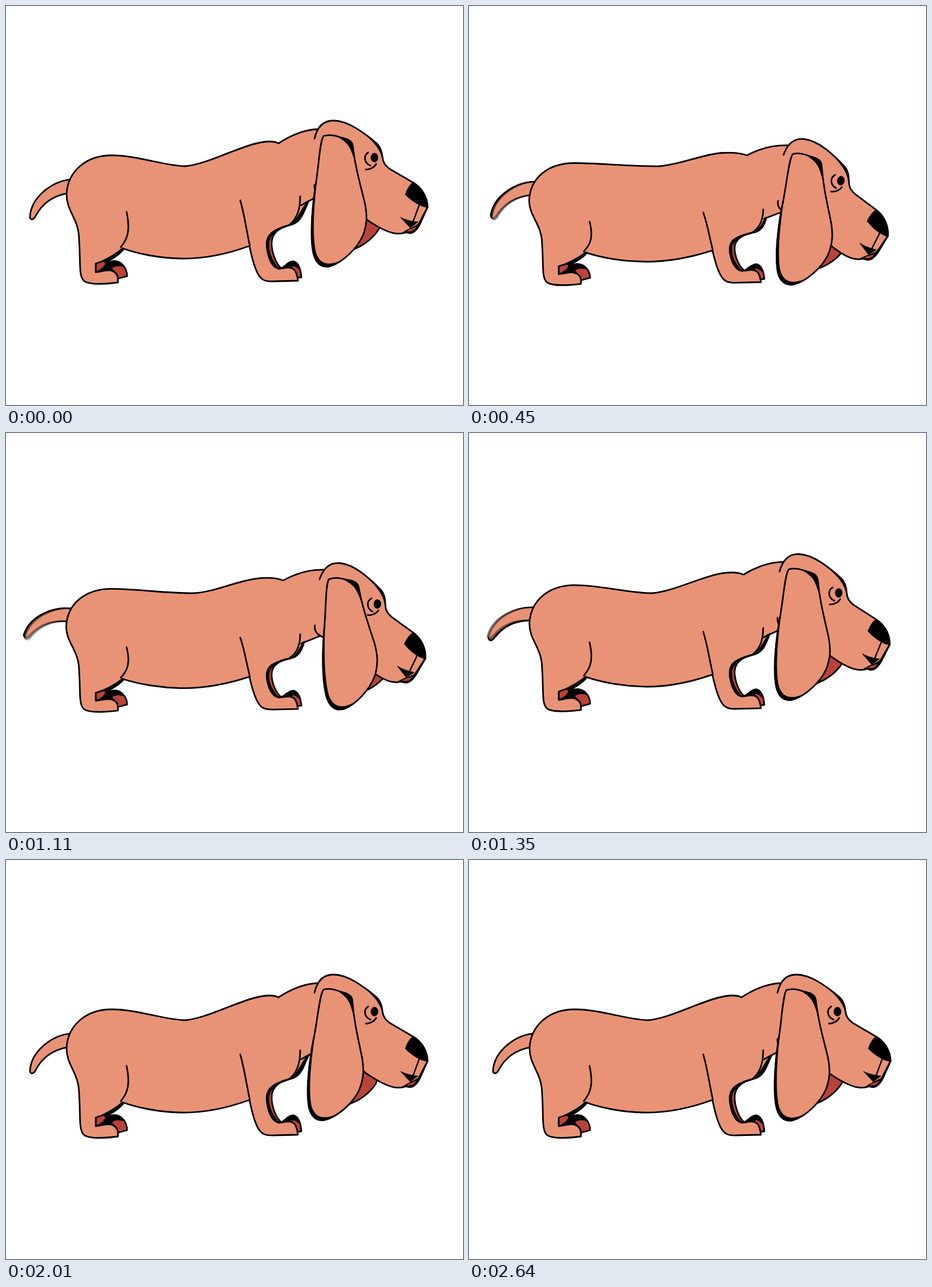
An HTML page for the animation above (2730 ms loop, 800 by 700 pixels).

```html
<!DOCTYPE html>
<html lang="en">
<head>
<meta charset="utf-8">
<title>Hound</title>
<style>
  html, body { margin: 0; width: 100%; height: 100%; overflow: hidden; background: #fff; }
  svg { display: block; width: 100vw; height: 100vh; }
  path { fill: none; stroke: #000; stroke-width: 2.8; stroke-linecap: round; stroke-linejoin: round; }
  .skin { fill: #e99376; }
  .red { fill: #b94339; }
  .ink { fill: #000; stroke-width: 1; }
</style>
</head>
<body>
<svg viewBox="0 0 800 700">
  <g id="tails">
    <path id="tail" class="skin" style="stroke-width:2.6" d="M118,304 C80,306 44,336 42,370 C42,376 48,375 51,370 C61,350 78,333 110,328"/>
  </g>

  <g id="far">
    <path class="red" d="M157,467 L157,450 L173,447 L178,460 Z"/>
    <path class="red" d="M172,457 C180,446 195,444 204,454 C210,460 212,468 212,474 L194,479 Z"/>
    <path class="ink" d="M160,465 C172,460 176,449 188,447 C198,447 205,452 209,459 C198,454 190,456 185,460 L196,472 Z"/>
    <path class="ink" d="M207,422 C200,432 186,442 171,447 L175,451 C188,444 200,436 207,427 Z"/>
    <path class="red" d="M503,382 C472,390 464,402 465,420 C467,440 475,455 482,460 L470,460 L455,425 L465,396 Z"/>
    <path class="red" d="M480,461 C488,458 495,447 504,448 C512,451 516,462 517,476 L508,477 Z"/>
    <path class="ink" d="M480,462 C488,458 495,447 503,448 C509,451 511,456 512,462 C507,456 502,455 500,457 L507,467 Z"/>
  </g>

  <path id="body" class="skin"/>
  <path id="chest" class="ink"/>
  <g id="near">
    <path d="M211,361 C215,380 217,400 206,416 L201,423"/>
    <path d="M410,341 C418,368 420,390 427,421"/>
    <path d="M515,334 C515,355 511,372 497,383"/>
    <path class="ink" d="M497,383 C478,388 456,396 456,418 C456,440 466,458 478,461 C468,450 460,436 460,418 C460,402 475,393 497,383 Z"/>
  </g>

  <g class="head">
    <g class="ear">
      <path class="red" d="M600,360 L657,370 C657,378 656,385 653,391 C644,405 630,419 606,428 Z"/>
    </g>
    <path class="skin" d="M540,233 C544,215 553,201 573,201 C600,201 628,224 648,240 C656,247 658,256 659,265 C660,275 664,280 672,286 L713,310 C730,320 738,338 738,353 L725,382 C718,397 708,400 701,397 C693,400 684,400 676,398 C655,392 640,380 630,374 L613,358 L560,335 C545,330 539,324 540,314"/>
    <path class="ink" d="M622,220 C642,232 656,243 659,268 C655,250 642,236 622,220 Z"/>
    <path class="ink" d="M713,309 C730,320 738,338 739,354 L728,351 C716,346 706,338 699,331 C702,322 706,314 713,309 Z"/>
    <path class="ink" d="M691,371 C700,376 712,378 721,379 L708,389 Z"/>
    <path class="ink" d="M694,398 C704,390 716,388 724,380 C720,397 711,402 701,398 Z"/>
    <path class="red" style="stroke:none" d="M701,395 C707,391 713,390 718,387 C715,394 709,397 701,395 Z"/>
    <path style="stroke-width:2.4" d="M723,350 L712,380 M737,354 L722,383"/>
    <path d="M634,257 C626,262 626,275 638,280 M630,287 C637,287 645,283 648,277"/>
    <ellipse cx="645" cy="266" rx="6.6" ry="8.2"/>
    <g class="ear">
      <path class="skin" d="M556,228 C549,235 547,290 541,320 C535,360 534,400 538,430 C541,453 553,459 566,457 C590,450 615,425 625,402 C633,380 632,365 628,345 C618,305 611,280 607,245 C606,238 600,234 594,233 C580,229 570,224 556,228 Z"/>
      <path class="ink" d="M545,295 C536,345 531,395 536,428 C540,458 562,468 590,445 C568,456 550,457 542,432 C535,400 539,345 545,295 Z"/>
      <path class="ink" d="M580,229 C595,231 604,234 606,243 L610,270 C604,251 602,241 580,229 Z"/>
    </g>
  </g>
</svg>
<script>
const LOOP = 2730, STEP = 30, SHUTTER = 22, COPIES = 6;
const $ = s => document.querySelector(s), $$ = s => [...document.querySelectorAll(s)];

// Back, neck and chest: head raised, head lowered
const BACK_UP = 'M128,412 C128,372 106,362 106,330 C108,290 140,262 185,262 C230,262 280,281 314,281 C355,277 410,245 448,239 C460,237 470,237 477,241 C500,226 522,217 546,216 L590,260 L560,330 L538,338 L516,350 L530,342 C522,356 518,378 498,384';
const BACK_DOWN = 'M128,419 C127,385 105,372 105,345 C107,303 140,280 185,280 C230,280 280,282 340,281 C375,279 405,266 440,264 C460,263 478,265 490,269 C510,259 535,253 561,254 L595,290 L575,360 L551,369 L517,381 L517,381 C517,390 510,399 498,402';
const CHEST_UP = 'M531,342 C522,358 520,382 496,385 C508,380 515,358 527,344 Z';
const CHEST_DOWN = 'M518,380 C518,390 512,402 496,403 C508,398 512,390 515,382 Z';
const LEGS = 'C484,388 474,391 466,397 C455,405 455,420 458,432 C461,447 467,459 478,461 C488,460 498,456 505,463 C510,470 510,476 511,482 L470,483 C452,484 446,480 440,468 C432,452 430,437 426,421 C385,436 345,444 305,443 C265,442 228,434 204,425 C190,438 178,443 168,448 L157,452 L157,467 C170,466 180,460 190,467 C197,472 196,480 196,485 C175,488 150,489 139,484 C126,478 131,450 128,412 Z';

const NUM = /\d+(\.\d+)?/g;
const mix = (a, b, p) => {
  const to = b.match(NUM);
  let i = 0;
  return a.replace(NUM, n => (+n + (to[i++] - n) * p).toFixed(2));
};
// Legs compress towards the ground
const sink = h => 2.8 + 0.06 * h + 0.00075 * h * h;
const squash = (d, p) => {
  let i = 0;
  return d.replace(NUM, n => i++ % 2 ? (+n + sink(490 - n) * p).toFixed(2) : n);
};

const ease = x => (1 - Math.cos(Math.PI * x)) / 2;
const track = (keys, t) => {
  if (t <= keys[0][0]) return keys[0][1];
  for (let i = 1; i < keys.length; i++) {
    const [t0, v0] = keys[i - 1], [t1, v1] = keys[i];
    if (t < t1) return v0 + (v1 - v0) * ease((t - t0) / (t1 - t0));
  }
  return keys[keys.length - 1][1];
};
const BOW = [[30, 0], [660, 1], [690, 1], [1700, 0]];
const EAR = [[120, 0], [930, -12], [1690, 6.5], [2280, -1], [2640, 0]];
const WAG = [[0, 0], [250, 40], [500, 0], [570, 0], [908, 40], [1240, 0], [1548, 40], [1855, 0]];

// Stacked copies average into motion blur
const tails = Array.from({ length: COPIES }, (_, i) => {
  const c = $('#tail').cloneNode();
  c.removeAttribute('id');
  c.setAttribute('opacity', 1 / (i + 1));
  return c;
});
$('#tails').replaceChildren(...tails);

const limbs = $$('#far path, #near path').map(el => [el, el.getAttribute('d')]);
const heads = $$('.head'), ears = $$('.ear');
const turn = (el, v) => el.setAttribute('transform', v);

function draw(t) {
  const p = track(BOW, t);
  $('#body').setAttribute('d', mix(BACK_UP, BACK_DOWN, p) + squash(LEGS, p));
  $('#chest').setAttribute('d', mix(CHEST_UP, CHEST_DOWN, p));
  limbs.forEach(([el, d]) => el.setAttribute('d', squash(d, p)));
  heads.forEach(el => turn(el, `translate(${8 * p} ${54 * p}) rotate(${9 * p} 645 266)`));
  ears.forEach(el => turn(el, `rotate(${track(EAR, t)} 575 228)`));
  tails.forEach((el, i) => {
    const a = track(WAG, t + SHUTTER * (i / (COPIES - 1) - 0.5));
    turn(el, `translate(${p} ${5 * p}) rotate(${a} 112 318)`);
  });
}

const start = performance.now();
function frame() {
  const t = (performance.now() - start) % LOOP;
  draw(Math.floor(t / STEP) * STEP);
  requestAnimationFrame(frame);
}
frame();
</script>
</body>
</html>
```
